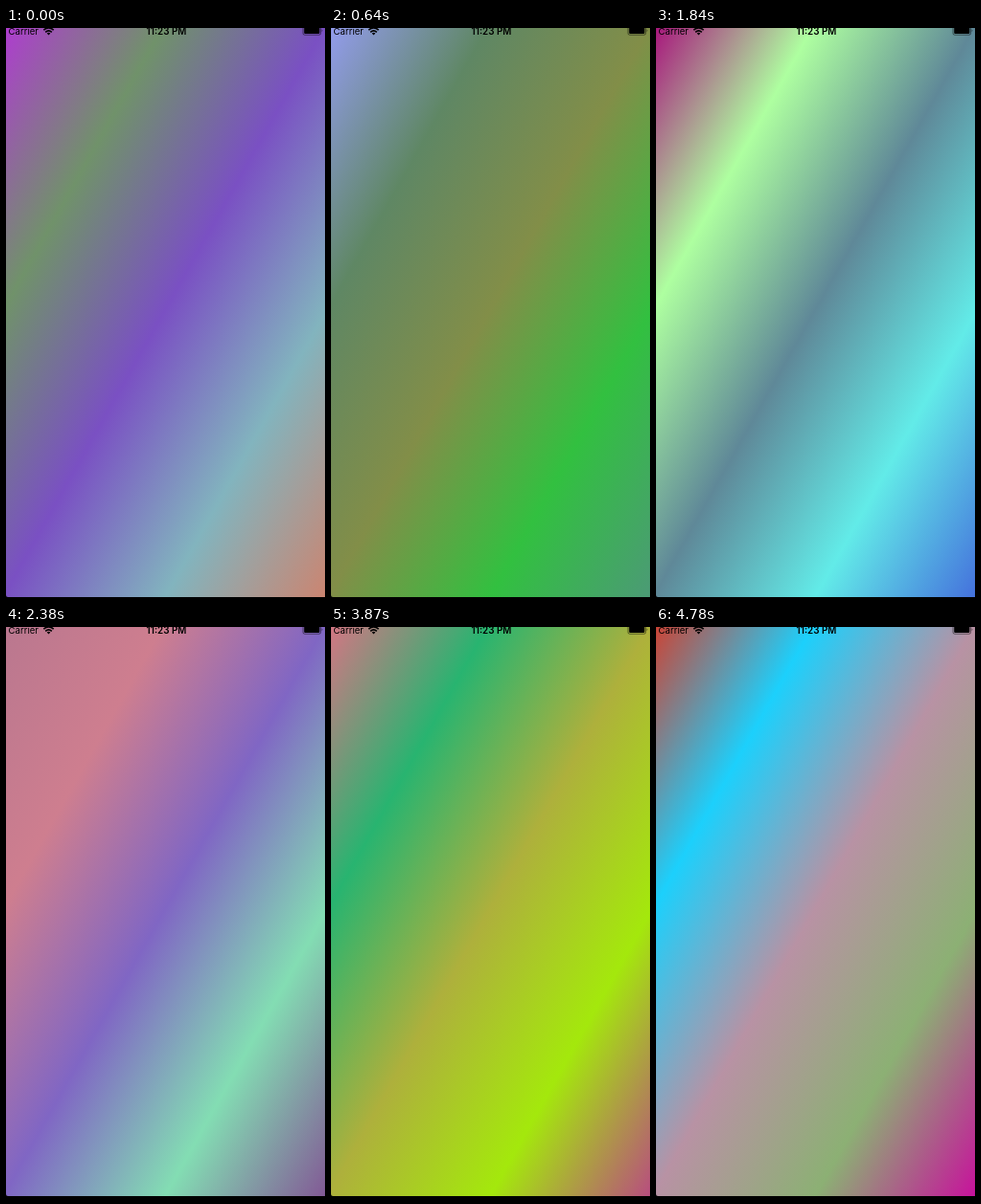
An HTML page that plays this animation: 333 px wide and 597 px high, repeating every 4.88 s.

```html
<!DOCTYPE html>
<html lang="en">
<head>
<meta charset="utf-8">
<title>Shifting gradient</title>
<style>
  html, body { margin: 0; width: 100%; height: 100%; overflow: hidden; background: #000; }
  #screen { position: absolute; left: 0; top: 0; width: 333px; height: 595px; overflow: hidden; border-bottom-left-radius: 2px; }
  #gradient { position: absolute; left: -3px; top: -5px; width: 338px; height: 600px; }
  svg { position: absolute; left: 0; top: 0; }
  text { font-family: Inter, Roboto, sans-serif; }
</style>
</head>
<body>
<div id="screen">
  <div id="gradient"></div>
  <svg width="333" height="20">
    <text x="2.6" y="7" font-size="9.6">Carrier</text>
    <text x="167.5" y="7" font-size="9.9" font-weight="600" text-anchor="middle">11:23 PM</text>
    <g fill="none" stroke="#000" stroke-width="1.6">
      <path d="M39.3 2.2Q44.5 -2.6 49.7 2.2M41.2 4.3Q44.5 1.4 47.8 4.3"/>
      <path d="M42.7 5.4Q44.5 4.2 46.3 5.4L44.5 7.4Z" fill="#000" stroke="none"/>
    </g>
    <rect x="310" y="-1.5" width="18.6" height="8.7" rx="1.8" fill="none" stroke="#000" stroke-opacity=".6" stroke-width=".8"/>
    <rect x="311.2" y="-.5" width="16.2" height="6.6" rx="1" />
    <path d="M329.7 1.2Q331.2 2.7 329.7 4.2Z" opacity=".7"/>
  </svg>
</div>
<script>
const LOOP = 4880;

// Each fade blends five evenly spaced colours linearly, then holds.
const fades = [
  { start: 0, end: 820,
    from: ['b03ad2', '70926a', '7a50c3', '82b4be', 'cc8470'],
    to:   ['8cb8f8', '5a8462', '84a026', '1cc41c', '28a078'] },
  { start: 1840, end: 2850,
    from: ['a8107c', 'aeffa0', '5f8898', '62ebe8', '4470dc'],
    to:   ['c8d0a0', 'ea0e80', '9c48ea', 'a0d084', 'b84458'] },
  { start: 3870, end: 4780,
    from: ['d87484', '28b470', 'aeb03c', 'a4e80c', 'b84c80'],
    to:   ['d04030', '1cd0fc', 'b892a4', '8cb074', 'c8109c'] },
];

// Runs of evenly spaced picture changes: first time, last time, count.
const runs = [
  [0, 0, 1], [120, 400, 4], [520, 640, 2], [700, 820, 2],
  [1840, 2320, 8], [2380, 2850, 6],
  [3870, 4280, 8], [4400, 4780, 7],
];
const ticks = runs.flatMap(([first, last, count]) =>
  Array.from({ length: count }, (_, i) => first + (last - first) * i / Math.max(1, count - 1)));

const channels = hex => [0, 2, 4].map(i => parseInt(hex.slice(i, i + 2), 16));

function mix(a, b, p) {
  const end = channels(b);
  return `rgb(${channels(a).map((v, i) => Math.round(v + (end[i] - v) * p))})`;
}

const gradient = document.getElementById('gradient');

function draw(now) {
  const time = now % LOOP;
  const shown = ticks.findLast(t => t <= time + 0.01);
  const { start, end, from, to } = fades.findLast(f => f.start <= shown);
  const progress = Math.min(1, (shown - start) / (end - start));
  const colors = from.map((color, i) => mix(color, to[i], progress));
  gradient.style.background = `linear-gradient(to bottom right, ${colors})`;
}

const origin = performance.now();
function frame() {
  draw(performance.now() - origin);
  requestAnimationFrame(frame);
}
frame();
</script>
</body>
</html>
```
